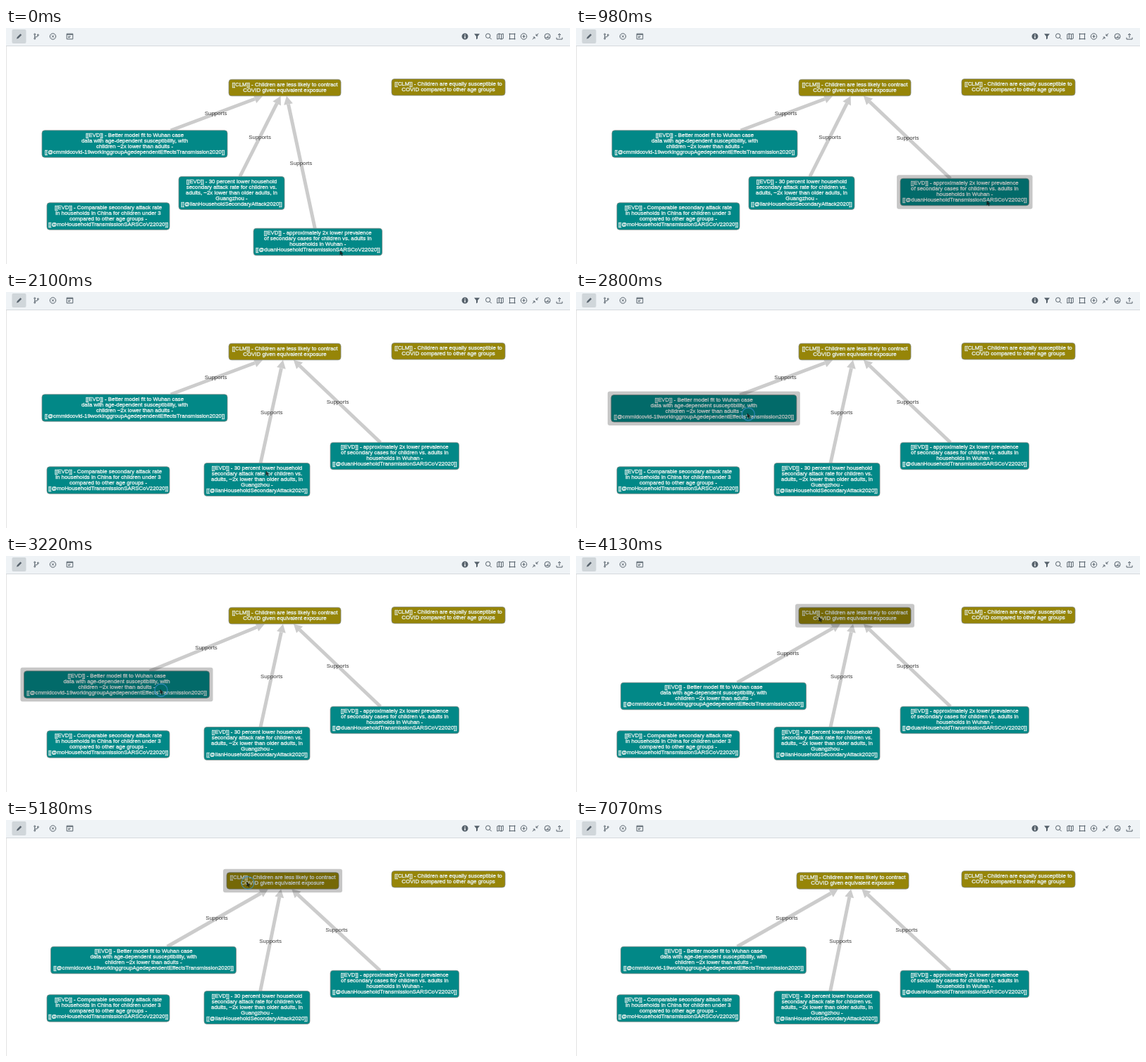
An HTML page with a canvas that plays this animation: 800x336 px, repeating every 7140 ms.

```html
<!DOCTYPE html>
<html lang="en">
<head>
<meta charset="utf-8">
<title>Evidence graph</title>
<style>
  html, body { margin: 0; width: 100%; height: 100%; overflow: hidden; background: #fff; }
  canvas { display: block; }
</style>
</head>
<body>
<canvas id="stage" width="800" height="336"></canvas>
<script>
const ctx = document.getElementById('stage').getContext('2d');
const LOOP = 7140;
const TEAL = '#028887', OLIVE = '#968508', EDGE = '#cccccc', INK = '#56616b';
const FONT = '"Liberation Sans", Arial, sans-serif';
const LINE_HEIGHT = 8;

const nodes = {
  less: { x: 395.5, y: 85, w: 159, h: 23.5, fill: OLIVE, lines: [
    '[[CLM]] - Children are less likely to contract', 'COVID given equivalent exposure'] },
  equal: { x: 627.5, y: 84.3, w: 161, h: 23.5, fill: OLIVE, lines: [
    '[[CLM]] - Children are equally susceptible to', 'COVID compared to other age groups'] },
  model: { x: 182.5, y: 165, w: 263, h: 38.5, fill: TEAL, lines: [
    '[[EVD]] - Better model fit to Wuhan case', 'data with age-dependent susceptibility, with',
    'children ~2x lower than adults -',
    '[[@cmmidcovid-19workinggroupAgedependentEffectsTransmission2020]]'] },
  attack: { x: 320, y: 235, w: 150, h: 47, fill: TEAL, lines: [
    '[[EVD]] - 30 percent lower household', 'secondary attack rate for children vs.',
    'adults, ~2x lower than older adults, in', 'Guangzhou -',
    '[[@lianHouseholdSecondaryAttack2020]]'] },
  china: { x: 145, y: 268, w: 174, h: 38.5, fill: TEAL, lines: [
    '[[EVD]] - Comparable secondary attack rate', 'in households in China for children under 3',
    'compared to other age groups -', '[[@moHouseholdTransmissionSARSCoV22020]]'] },
  prevalence: { x: 442.3, y: 304.5, w: 182.5, h: 38.5, fill: TEAL, lines: [
    '[[EVD]] - approximately 2x lower prevalence', 'of secondary cases for children vs. adults in',
    'households in Wuhan -', '[[@duanHouseholdTransmissionSARSCoV22020]]'] }
};
const supporters = ['model', 'attack', 'prevalence'];

// Pointer keyframes: time, x, y
const pointer = [
  [0, 475, 320], [120, 475, 320], [840, 584, 249], [1050, 584, 249],
  [1400, 334, 226], [1480, 334, 226], [1880, 370, 258], [2150, 370, 258],
  [2650, 245.5, 175], [2750, 245.5, 175], [3150, 220, 193], [3220, 220, 193],
  [3600, 258, 209.5], [3720, 258, 209.5], [4020, 346, 90], [4130, 346, 90],
  [4400, 378, 102], [4750, 320, 98], [5050, 343, 91.5], [6200, 343, 91.5], [6600, 420, -14]
];

// Each node follows the pointer between press and release
const drags = [
  { node: 'prevalence', press: 100, release: 1050 },
  { node: 'attack', press: 1440, release: 2000 },
  { node: 'model', press: 2700, release: 3700, ring: 2750 },
  { node: 'less', press: 4080, release: 5600, ring: 4250 }
];

const icons = [
  [18.5, 'M-3.5 3.5L-2.7 1L2 -3.7L3.7 -2L-1 2.7Z', true],
  [43, 'M-2.2 -2V2M-2.2 1Q2.4 1 2.4 -1M-1.2 -3A1 1 0 1 1 -3.2 -3A1 1 0 1 1 -1.2 -3M-1.2 3A1 1 0 1 1 -3.2 3A1 1 0 1 1 -1.2 3M3.4 -2A1 1 0 1 1 1.4 -2A1 1 0 1 1 3.4 -2'],
  [66.5, 'M4.2 0A4.2 4.2 0 1 1 -4.2 0A4.2 4.2 0 1 1 4.2 0M-1.6 -1.6L1.6 1.6M1.6 -1.6L-1.6 1.6'],
  [90.5, 'M-4.3 -3.8H4.3V3.8H-4.3ZM-4.3 -2.6H4.3M-2.4 0H1.2M-2.4 1.6H0'],
  [651, 'M4.5 0A4.5 4.5 0 1 1 -4.5 0A4.5 4.5 0 1 1 4.5 0ZM-.8 -2.8V-1.5H.8V-2.8ZM-.8 -.6V2.8H.8V-.6Z', true],
  [668, 'M-4 -3.8H4L1 0V3L-1 4.2V0Z', true],
  [684.5, 'M2.4 -.8A3.2 3.2 0 1 1 -4 -.8A3.2 3.2 0 1 1 2.4 -.8M1.6 1.6L4.2 4.2'],
  [701, 'M-4.2 -3L-1.5 -4L1.5 -3L4.2 -4V3L1.5 4L-1.5 3L-4.2 4ZM-1.5 -4V3M1.5 -3V4'],
  [718, 'M-3.5 -3.5H3.5V3.5H-3.5ZM-4.5 -3.5H4.5M-4.5 3.5H4.5M-3.5 -4.5V4.5M3.5 -4.5V4.5'],
  [734.5, 'M4.2 0A4.2 4.2 0 1 1 -4.2 0A4.2 4.2 0 1 1 4.2 0M-2.2 0H2.2M0 -2.2V2.2'],
  [751, 'M4.2 -4.2L1 -1M1 -3.4V-1H3.4M-4.2 4.2L-1 1M-1 3.4V1H-3.4'],
  [768, 'M4 0A4 4 0 1 1 -4 0A4 4 0 1 1 4 0M0 1.5L1.5 -1.5M-2.5 1.5H2.5'],
  [785, 'M0 2V-4M-2 -2L0 -4L2 -2M-4 1.5V4H4V1.5']
].map(([x, d, solid]) => ({ x, path: new Path2D(d), solid }));
const arrowPointer = new Path2D('M0 0V7L1.7 5.5L2.9 7.9L4 7.4L3 5.1H5.2Z');

const clamp = (v, lo, hi) => Math.min(hi, Math.max(lo, v));

function pointerAt(t) {
  const next = pointer.findIndex(key => key[0] > t);
  if (next < 0) return pointer.at(-1).slice(1);
  const [t0, x0, y0] = pointer[next - 1], [t1, x1, y1] = pointer[next];
  const u = (t - t0) / (t1 - t0), e = u * u * (3 - 2 * u);
  return [x0 + (x1 - x0) * e, y0 + (y1 - y0) * e];
}

function layout(t) {
  const placed = {};
  for (const id in nodes) placed[id] = { ...nodes[id] };
  for (const { node, press, release } of drags) {
    const [x0, y0] = pointerAt(press), [x, y] = pointerAt(clamp(t, press, release));
    placed[node].x += x - x0;
    placed[node].y += y - y0;
    placed[node].active = t >= press && t < release;
  }
  return placed;
}

function box(x, y, w, h, r) {
  ctx.beginPath();
  ctx.roundRect(x - w / 2, y - h / 2, w, h, r);
}

// weight thickens the glyphs with an outline of the same colour
function text(str, x, y, size, color, weight = 0) {
  ctx.font = `${size}px ${FONT}`;
  ctx.fillStyle = ctx.strokeStyle = color;
  ctx.fillText(str, x, y);
  if (!weight) return;
  ctx.lineWidth = weight;
  ctx.strokeText(str, x, y);
}

// Where the line from a node's centre towards (dx, dy) leaves its box
function border(node, dx, dy) {
  const k = Math.min(node.w / 2 / Math.abs(dx || 1e-6), node.h / 2 / Math.abs(dy || 1e-6));
  return [node.x + dx * k, node.y + dy * k];
}

function drawEdge(from, to) {
  const dx = to.x - from.x, dy = to.y - from.y, len = Math.hypot(dx, dy);
  const [sx, sy] = border(from, dx, dy), [ex, ey] = border(to, -dx, -dy);
  const ux = dx / len, uy = dy / len;
  const bx = ex - ux * 12, by = ey - uy * 12;
  ctx.strokeStyle = ctx.fillStyle = EDGE;
  ctx.lineWidth = 5;
  ctx.beginPath();
  ctx.moveTo(sx, sy);
  ctx.lineTo(bx, by);
  ctx.stroke();
  ctx.beginPath();
  ctx.moveTo(ex, ey);
  ctx.lineTo(bx - uy * 6.5, by + ux * 6.5);
  ctx.lineTo(bx + uy * 6.5, by - ux * 6.5);
  ctx.fill();
  text('Supports', (sx + ex) / 2 - ux * 1.5, (sy + ey) / 2 - uy * 1.5, 7.9, '#3c3c3c');
}

function drawNode(n) {
  box(n.x, n.y, n.w, n.h, 4);
  ctx.fillStyle = n.fill;
  ctx.fill();
  ctx.strokeStyle = 'rgba(130,138,134,.75)';
  ctx.lineWidth = 1;
  ctx.stroke();
  n.lines.forEach((line, i) =>
    text(line, n.x, n.y + (i - (n.lines.length - 1) / 2) * LINE_HEIGHT - .3, 7.87, '#e6f0ee', .35));
  if (n.active) {
    box(n.x, n.y, n.w + 10, n.h + 10, 3);
    ctx.fillStyle = 'rgba(0,0,0,.22)';
    ctx.fill();
  }
}

function drawToolbar() {
  ctx.fillStyle = '#eff3f6';
  ctx.fillRect(0, 0, 800, 25);
  ctx.fillStyle = '#d6dadd';
  ctx.fillRect(0, 25, 800, 1);
  ctx.fillStyle = '#e2e2e2';
  ctx.fillRect(0, 26, 1, 310);
  box(18.5, 12, 20, 20, 2);
  ctx.fillStyle = '#d0d6da';
  ctx.fill();
  ctx.strokeStyle = ctx.fillStyle = INK;
  ctx.lineWidth = 1;
  for (const { x, path, solid } of icons) {
    ctx.save();
    ctx.translate(x, 12);
    solid ? ctx.fill(path, 'evenodd') : ctx.stroke(path);
    ctx.restore();
  }
}

function drawPointer(t) {
  const [x, y] = pointerAt(t);
  if (drags.some(d => d.ring && t >= d.ring && t < d.release)) {
    ctx.beginPath();
    ctx.arc(x, y - 2, 9, 0, 2 * Math.PI);
    ctx.strokeStyle = 'rgba(60,145,205,.75)';
    ctx.lineWidth = 1.3;
    ctx.stroke();
  }
  ctx.save();
  ctx.translate(x - 1.5, y - 3.5);
  ctx.fillStyle = 'rgba(20,25,25,.85)';
  ctx.fill(arrowPointer);
  ctx.restore();
}

function draw(now) {
  const t = now % LOOP, placed = layout(t);
  ctx.fillStyle = '#fff';
  ctx.fillRect(0, 0, 800, 336);
  ctx.textAlign = 'center';
  ctx.textBaseline = 'middle';
  ctx.lineJoin = 'round';
  drawToolbar();
  supporters.forEach(id => drawEdge(placed[id], placed.less));
  Object.values(placed).forEach(drawNode);
  drawPointer(t);
}

const start = performance.now();
function tick() {
  draw(performance.now() - start);
  requestAnimationFrame(tick);
}
tick();
</script>
</body>
</html>
```
